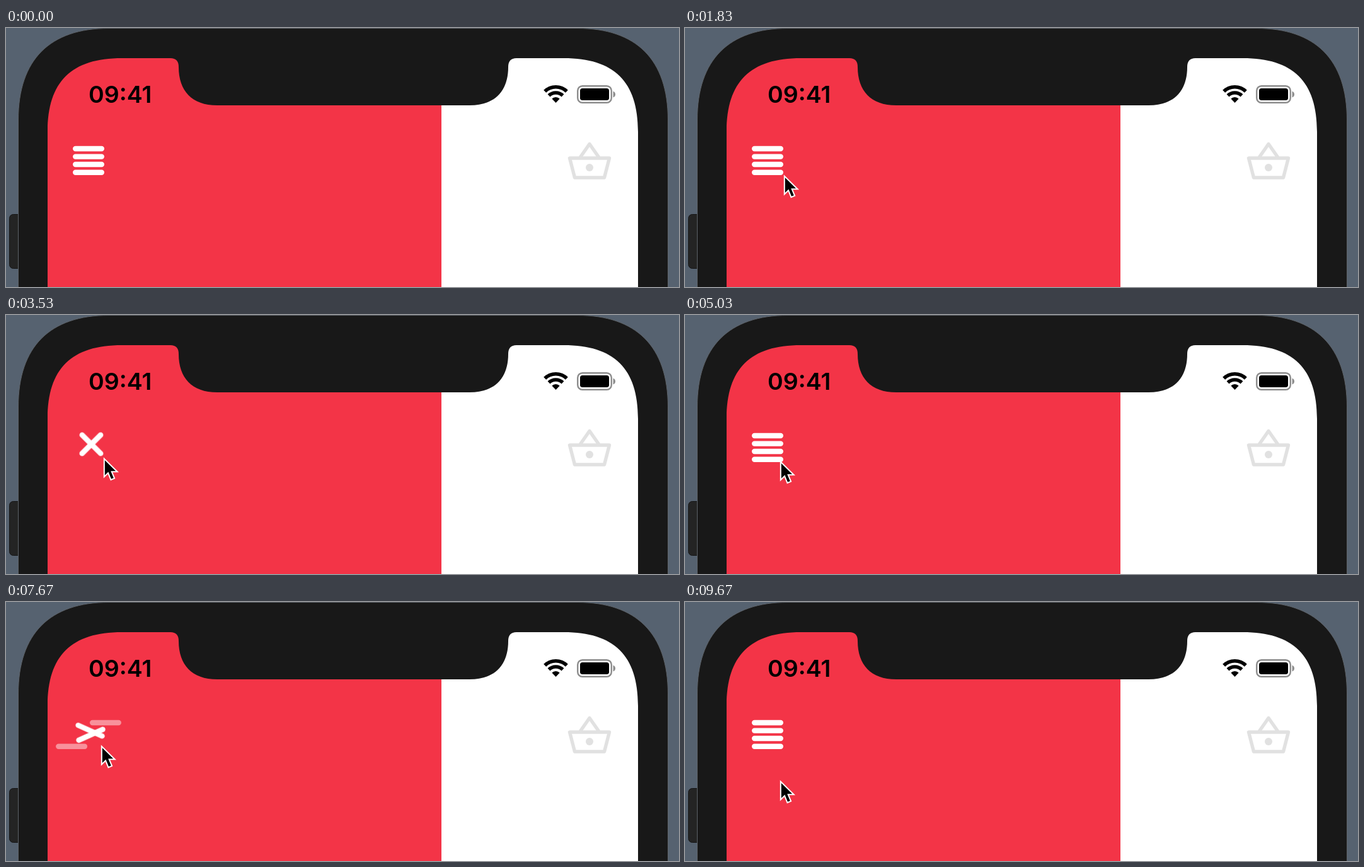
An HTML page for the animation above (9710 ms loop, 1068x412 px).

```html
<!DOCTYPE html>
<html lang="en">
<head>
<meta charset="utf-8">
<title>Menu button</title>
<style>
  html, body { margin: 0; width: 100%; height: 100%; overflow: hidden; background: #566270; }
  svg { display: block; width: 1068px; height: 412px; }
  .clock { font: 600 37.5px Inter, Roboto, sans-serif; }
  .bar { fill: #fff; }
  #fall { transform-origin: 132.2px 210.5px; }
  #rise { transform-origin: 119.4px 205.9px; }
</style>
</head>
<body>
<svg viewBox="0 0 1068 412">
  <defs>
    <clipPath id="screen">
      <path d="M66 420V165C66 85 104 48 184 48H261Q274 48 274 62C274 100 295 123 335 123H736C776 123 797 100 797 62Q797 48 810 48H885C965 48 1003 85 1003 165V420Z"/>
    </clipPath>
    <clipPath id="wedge"><path d="M872.5 119L842 87V80H903V87Z"/></clipPath>
  </defs>

  <rect x="5.5" y="296.5" width="24" height="86" rx="6" fill="#242424" stroke="#151515"/>
  <path d="M19.5 420V146C19.5 50 70 .5 163 .5H907C1000 .5 1050.5 50 1050.5 146V420Z" fill="#181818" stroke="#5d6268"/>

  <g clip-path="url(#screen)">
    <rect x="60" y="40" width="631" height="380" fill="#f33447"/>
    <rect x="691" y="40" width="320" height="380" fill="#fff"/>
  </g>

  <text class="clock" x="131" y="119">09:41</text>

  <g clip-path="url(#wedge)" fill="none" stroke="#000" stroke-width="5.6">
    <circle cx="872.5" cy="119" r="25.2"/>
    <circle cx="872.5" cy="119" r="16"/>
    <circle cx="872.5" cy="119" r="9" fill="#000" stroke="none"/>
  </g>

  <rect x="907.2" y="92.2" width="53.6" height="26.6" rx="7.5" fill="none" stroke="#8c8c8c" stroke-width="2.4"/>
  <rect x="911" y="96" width="46" height="19" rx="3.8"/>
  <path d="M963.5 100.5Q967 102 967 105.5T963.5 110.5Z" fill="#8c8c8c"/>

  <g fill="none" stroke="#e1e1e1" stroke-width="5.4" stroke-linejoin="round">
    <path d="M894.5 207H957.5L949.5 238H902.5Z"/>
    <path d="M911 206L926 184.5L941 206"/>
    <circle cx="926" cy="222" r="6" fill="#e1e1e1" stroke="none"/>
  </g>

  <g class="bar">
    <rect id="top" x="106" y="187.8" width="50" height="8.4" rx="4.2"/>
    <rect id="fall" x="106" y="200.4" width="50" height="8.4" rx="4.2"/>
    <rect id="rise" x="106" y="212.8" width="50" height="8.4" rx="4.2"/>
    <rect id="bottom" x="106" y="225.5" width="50" height="8.4" rx="4.2"/>
  </g>

  <path id="cursor" d="M1.8 4V28L7.4 22.6L12 33.8L15.8 32.2L11.2 21.2H19.2Z" stroke="#fff" stroke-width="4" paint-order="stroke"/>
</svg>
<script>
  const LOOP = 9710;
  const SWITCH = 400;
  const toggles = [2250, 4250, 5450, 7480];

  // time, x, y of the pointer tip
  const pointerPath = [
    [0, 330, 425], [900, 330, 425], [1700, 157, 234], [2000, 157, 234],
    [2500, 155, 227], [3700, 155, 227], [4300, 151, 232], [5200, 151, 232],
    [5700, 151, 236], [6300, 151, 236], [7200, 151, 228], [8300, 151, 228],
    [9100, 151, 284], [LOOP, 151, 284]
  ];

  const play = (id, frames) => {
    const animation = document.getElementById(id).animate(frames, { duration: LOOP, iterations: Infinity });
    animation.startTime = document.timeline.currentTime;
  };

  const toggleBetween = (id, closed, open) => {
    const states = [closed, open];
    const frames = [{ ...closed, offset: 0 }];
    toggles.forEach((time, i) => {
      frames.push({ ...states[i % 2], offset: time / LOOP, easing: 'ease-in-out' });
      frames.push({ ...states[(i + 1) % 2], offset: (time + SWITCH) / LOOP });
    });
    frames.push({ ...closed, offset: 1 });
    play(id, frames);
  };

  const slide = (id, x) => toggleBetween(id,
    { transform: 'translateX(0px)', opacity: 1 },
    { transform: `translateX(${x}px)`, opacity: 0 });

  const turn = (id, angle) => toggleBetween(id,
    { transform: 'rotate(0deg)' },
    { transform: `rotate(${angle}deg)` });

  slide('top', 50);
  slide('bottom', -50);
  turn('fall', 45);
  turn('rise', -45);

  play('cursor', pointerPath.map(([time, x, y]) => ({
    offset: time / LOOP,
    transform: `translate(${x}px, ${y}px)`,
    easing: 'ease-in-out'
  })));
</script>
</body>
</html>
```
